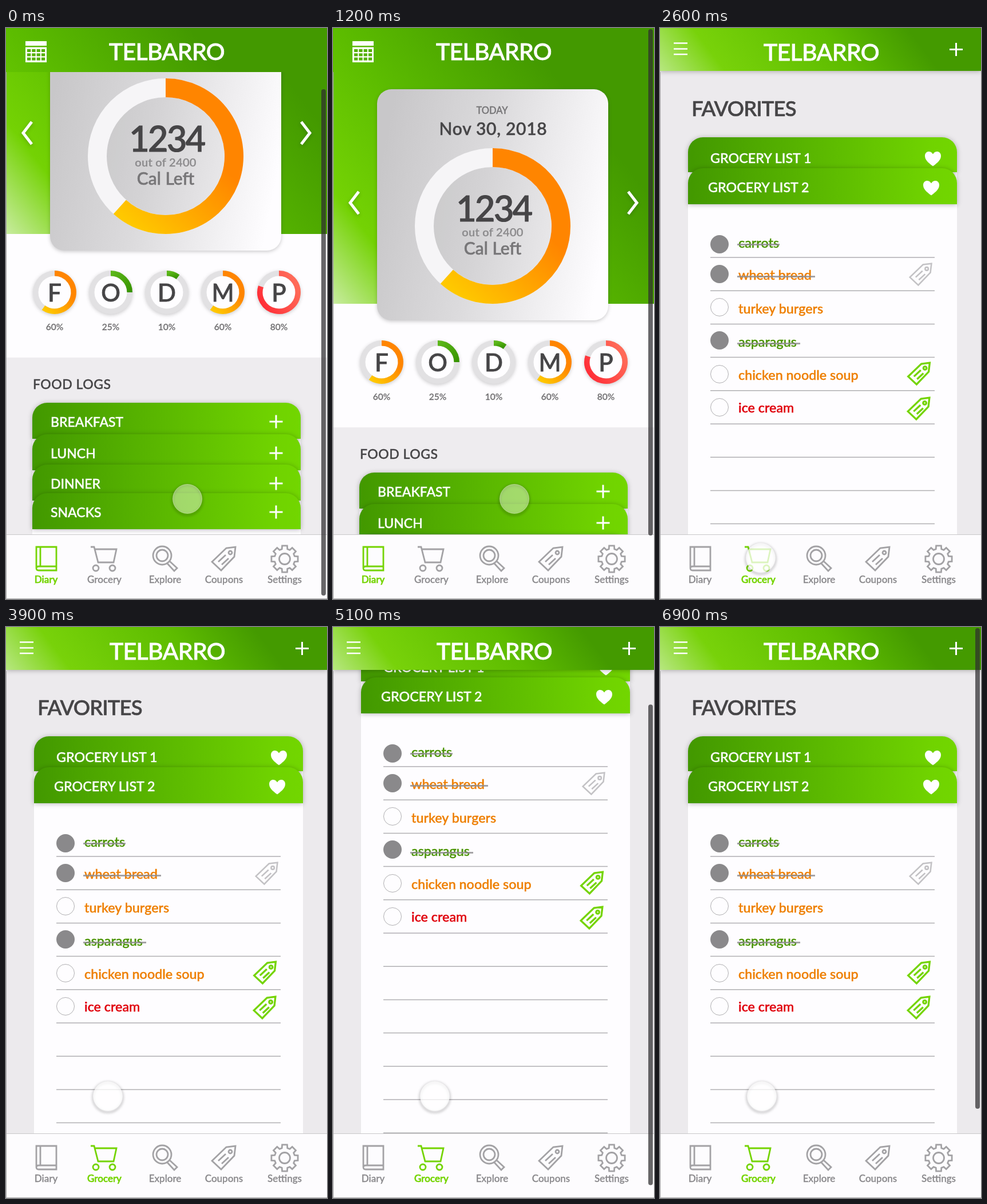
These frames come from a looping animation (561 px wide and 998 px high, 7000 ms). An HTML page:

```html
<!DOCTYPE html>
<html lang="en">
<head>
<meta charset="utf-8">
<title>Food diary app</title>
<style>
  html, body { margin: 0; width: 100%; height: 100%; overflow: hidden; background: #fefdff; }
  svg { display: block; width: 561px; height: 998px; }
  text { font-family: Lato, sans-serif; font-weight: 500; }
  .card { filter: drop-shadow(0 1px 4px rgba(0,0,0,.28)); }
  .soft { filter: drop-shadow(0 2px 3px rgba(0,0,0,.2)); }
  .tab { --ink: #a3a2a5; --label: #8a898c; }
  .tab.on { --ink: #74d400; --label: #74d400; }
  .tab path { fill: none; stroke: var(--ink); stroke-width: 2.8; }
  .tab text { fill: var(--label); stroke: var(--label); stroke-width: .35px; }
  .tab.on text { stroke-width: .7px; }
</style>
</head>
<body>
<svg id="stage" viewBox="0 0 561 998"></svg>
<script>
const LOOP = 7000, STEP = 100, SWITCH = 2500;
const INK = '#464547', WHITE = '#fefdff', GREY = '#eeecef', LIME = '#74d400';

// Drawing helpers, each returning SVG markup; the thin stroke gives text a medium weight
const text = (x, y, size, fill, str, extra = '') =>
  `<text x="${x}" y="${y}" font-size="${size}" fill="${fill}" stroke="${fill}" stroke-width="${size * .02}" ${extra}>${str}</text>`;
const mid = (x, y, size, fill, str, extra = '') =>
  text(x, y, size, fill, str, `text-anchor="middle" ${extra}`);
const rect = (x, y, w, h, fill, extra = '') =>
  `<rect x="${x}" y="${y}" width="${w}" height="${h}" fill="${fill}" ${extra}/>`;
const line = (d, color, width) =>
  `<path d="${d}" fill="none" stroke="${color}" stroke-width="${width}"/>`;
const circle = (x, y, r, fill, extra = '') =>
  `<circle cx="${x}" cy="${y}" r="${r}" fill="${fill}" ${extra}/>`;
const plus = (x, y) => line(`M${x - 11.5} ${y}h23M${x} ${y - 11.5}v23`, '#fff', 3);
const gradient = (id, coords, stops, units = 'objectBoundingBox') => {
  const [x1, y1, x2, y2] = coords;
  return `<linearGradient id="${id}" gradientUnits="${units}" x1="${x1}" y1="${y1}" x2="${x2}" y2="${y2}">` +
    stops.map(([o, c]) => `<stop offset="${o}" stop-color="${c}"/>`).join('') + '</linearGradient>';
};

function arc(x, y, r, part, paint, width) {
  const a = part * 2 * Math.PI;
  return line(`M${x} ${y - r}A${r} ${r} 0 ${part > .5 ? 1 : 0} 1 ${x + r * Math.sin(a)} ${y - r * Math.cos(a)}`,
    `url(#${paint})`, width);
}

// Panel with a green rounded head and a white body
const panel = (x, y, w, head, body) => rect(x, y + head, w, body, WHITE) +
  `<path class="card" d="M${x} ${y + head}V${y + 26}a26 26 0 0 1 26 -26h${w - 52}a26 26 0 0 1 26 26V${y + head}z" fill="url(#head)"/>`;

const heart = (x, y) => `<path transform="translate(${x} ${y})" fill="#fff"
  d="M0 12.500C-9 6 -14 1 -14 -5.500C-14 -14 -4 -15.500 0 -8.500C4 -15.500 14 -14 14 -5.500C14 1 9 6 0 12.500z"/>`;

const tag = 'M-21 5L4 -19L20 -21L18 -4L-5 20ZM-10 5L3 -7M-4 10L8 -1M8 -11a3 3 0 1 0 6 0a3 3 0 1 0 -6 0';
const placedTag = (x, y, color, width) =>
  `<g transform="translate(${x} ${y}) scale(.92)">${line(tag, color, width)}</g>`;

function gear() {
  const points = [];
  for (let i = 0; i < 8; i++)
    for (const [turn, r] of [[-.27, 18], [-.19, 23.5], [.19, 23.5], [.27, 18]]) {
      const a = i * Math.PI / 4 + turn;
      points.push(`${(r * Math.sin(a)).toFixed(1)} ${(-r * Math.cos(a)).toFixed(1)}`);
    }
  return `M${points.join('L')}ZM-9.500 0a9.500 9.500 0 1 0 19 0a9.500 9.500 0 1 0 -19 0`;
}

const defs = '<defs>' +
  gradient('sky', [0, 482, 480, 100], [[0, '#c8ec9f'], [.2, '#74d204'], [.5, '#5cbc00'], [.9, '#439900']], 'userSpaceOnUse') +
  gradient('bar', [0, 90, 320, -150], [[0, '#bde98b'], [.25, '#78d20a'], [.7, '#5ebc00'], [1, '#449a00']], 'userSpaceOnUse') +
  gradient('head', [0, 0, 1, 0], [[0, '#429800'], [.9, '#70d300'], [1, '#72d600']]) +
  gradient('silver', [0, .4, 1, .6], [[0, '#c8c7c9'], [.45, '#dcdbdd'], [1, '#fefdff']]) +
  gradient('orange', [.1, 1, .6, .35], [[0, '#ffc800'], [1, '#ff8500']]) +
  gradient('green', [0, 0, 1, 1], [[0, '#5cb81a'], [1, '#389400']]) +
  gradient('red', [0, .7, .9, .2], [[0, '#ff2f38'], [1, '#ff6a58']]) +
  '</defs>';

const title = (x, y) => text(x, y, 41, '#fff', 'TELBARRO', 'letter-spacing="-.7"');

function diary() {
  const rings = [['F', 60, 'orange'], ['O', 25, 'green'], ['D', 10, 'green'], ['M', 60, 'orange'], ['P', 80, 'red']];
  const logs = [['BREAKFAST', 777], ['LUNCH', 832], ['DINNER', 885], ['SNACKS', 935]];
  let cells = '';
  for (let i = 0; i < 12; i++)
    cells += rect(37 + i % 4 * 8.3, 37 + Math.floor(i / 4) * 7.3, 6.3, 5, '#55b000');
  return `<g id="diary"><g id="diaryBody">
    ${rect(0, 0, 561, 482, 'url(#sky)')}${rect(0, 482, 561, 216, WHITE)}${rect(0, 698, 561, 480, GREY)}
    ${rect(77, 107, 404, 404, 'url(#silver)', 'rx="25" class="soft"')}
    ${mid(278, 150, 16.5, '#757476', 'TODAY')}
    ${mid(280, 187, 30, INK, 'Nov 30, 2018', 'letter-spacing=".7"')}
    ${circle(279, 346, 103, '#000', 'opacity=".035"')}
    ${circle(279, 346, 119.5, 'none', 'stroke="#f6f5f7" stroke-width="33"')}
    ${arc(279, 346, 119.5, .617, 'orange', 33)}
    ${mid(281, 338, 61, INK, '1234', 'letter-spacing="-2.500"')}
    ${mid(279, 364, 20, '#8b8a8c', 'out of 2400', 'letter-spacing=".3"')}
    ${mid(279, 396, 30, '#777678', 'Cal Left')}
    <g class="soft">${line('M45 286L30 305.500L45 325M516 286L531 305.500L516 325', '#fff', 5)}</g>
    ${rings.map(([name, pct, paint], i) => {
      const x = 85 + 98 * i;
      return `<g class="soft">${circle(x, 584, 38, '#e2e1e3')}</g>${circle(x, 584, 28.5, WHITE)}` +
        arc(x, 584, 33.2, pct / 100, paint, 9.5) +
        mid(x, 600, 42, INK, name) + mid(x, 650, 15.5, '#6f6e70', pct + '%');
    }).join('')}
    ${text(47, 753, 23, INK, 'FOOD LOGS', 'letter-spacing=".5"')}
    ${logs.map(([name, y]) => panel(46, y, 469, 63, 60) +
      text(78, y + 42, 23, '#fff', name) + plus(472, y + 33)).join('')}
    </g>
    ${rect(0, 0, 561, 77, 'url(#sky)')}
    ${rect(34, 23, 37, 8, '#fff')}${rect(34, 33.5, 37, 26.5, '#fff')}${cells}
    ${title(180, 56)}</g>`;
}

function grocery() {
  const green = '#4a9400', orange = '#ee7f00';
  // label, colour, circle y, baseline, strike length
  const items = [
    ['carrots', green, 378, 384, 74], ['wheat bread', orange, 430, 440, 136],
    ['turkey burgers', orange, 488, 499, 0], ['asparagus', green, 546, 557, 110],
    ['chicken noodle soup', orange, 605, 615, 0], ['ice cream', '#e0000c', 663, 672, 0]];
  let rules = '';
  for (let i = 0; i < 12; i++) rules += `M88 ${401 + 58.2 * i}H480`;
  return `<g id="grocery">${rect(0, 0, 561, 998, '#eceaed')}<g id="groceryBody">
    ${text(55, 154, 36.5, INK, 'FAVORITES', 'letter-spacing="-.9"')}
    ${panel(49, 191, 470, 61, 118)}${text(88, 236, 23.3, '#fff', 'GROCERY LIST 1')}${heart(477, 229)}
    ${panel(49, 245, 470, 63, 900)}${text(84, 287, 23.3, '#fff', 'GROCERY LIST 2')}${heart(474, 280)}
    ${line(rules, '#b0afb2', 1.5)}
    ${items.map(([name, color, y, base, strike]) =>
      (strike ? circle(104, y, 16, '#8a898b') : circle(104, y, 15.5, WHITE, 'stroke="#b0afb2"')) +
      text(137, base, 23.3, color, name) +
      (strike ? line(`M135 ${base - 5.5}h${strike}`, '#8f8e90cc', 3) : '')).join('')}
    ${placedTag(456, 431, '#c3c2c5', 2.8)}${placedTag(453, 604.5, LIME, 3.6)}${placedTag(452.5, 665.5, LIME, 3.6)}
    </g>
    ${rect(0, 0, 561, 75, 'url(#bar)', 'class="card"')}
    ${line('M24 26.500h24M24 36.500h24M24 46h24', '#fff', 2.6)}${plus(517.5, 37.5)}${title(181, 57)}</g>`;
}

function tabs() {
  const icons = [
    ['Diary', 70, 'M-17 -21H18V20H-13q-4 0 -4 -4ZM-10 -21V13M-17 16q0 -3 4 -3H18'],
    ['Grocery', 172, 'M-24 -21h6L-11 6H16L21 -17H-17M-20 16a5 5 0 1 0 10 0a5 5 0 1 0 -10 0M9 16a5 5 0 1 0 10 0a5 5 0 1 0 -10 0'],
    ['Explore', 278, 'M-21 -6a16 16 0 1 0 32 0a16 16 0 1 0 -32 0M-15 -6a10 10 0 1 0 20 0a10 10 0 1 0 -20 0M8 4L21 16L16 21L4 8'],
    ['Coupons', 381, tag],
    ['Settings', 487, gear()]];
  return rect(0, 885, 561, 113, '#fdfcfe') + line('M0 885.500H561', '#c9c8ca', 1) +
    icons.map(([name, x, d]) => `<g class="tab" id="tab${name}">
      <path transform="translate(${x} 928)" d="${d}"/>${mid(x, 970, 17, '', name)}</g>`).join('') +
    line('M.5 77V997.500H561', '#a9a8aa', 1);
}

document.getElementById('stage').innerHTML = defs + diary() + grocery() + tabs() + `
  <g id="touch">${circle(0, 2, 26, 'none', 'stroke="#000" stroke-opacity=".25" stroke-width="3" style="filter:blur(2px)"')}
  ${circle(0, 0, 25.5, '#fff', 'id="touchFill" stroke="#fff" stroke-opacity=".4"')}</g>
  ${rect(551, 2, 8, 885, '#2e2d30', 'id="thumb" rx="4"')}`;

// Smooth interpolation through [time, value] keys
function track(t, keys) {
  if (t <= keys[0][0]) return keys[0][1];
  for (let i = 1; i < keys.length; i++) {
    const [t0, v0] = keys[i - 1], [t1, v1] = keys[i];
    if (t < t1) {
      const u = (t - t0) / (t1 - t0);
      return v0 + (v1 - v0) * u * u * (3 - 2 * u);
    }
  }
  return keys[keys.length - 1][1];
}

// lead: how far the scroll bar runs ahead of the page, in ms
const pages = {
  diary: { scroll: [[0, 122], [662, 0], [1250, 0], [1750, 72]], lead: 5, ratio: .86, thumb: 885, touch: .42 },
  grocery: { scroll: [[4000, 0], [5400, 178], [5570, 178], [6250, 0]], lead: 15, ratio: .84, thumb: 840, touch: .75 }
};
const touchX = [[1850, 317], [2350, 176], [3350, 176], [3900, 178]];
const touchY = [[1850, 823], [2350, 926], [3350, 926], [3900, 820]];
const thumbAlpha = [[1850, .72], [2150, 0], [3950, 0], [4150, .72]];

const el = id => document.getElementById(id);
const move = (id, x, y) => el(id).setAttribute('transform', `translate(${x} ${y})`);

function draw() {
  const t = Math.floor(performance.now() % LOOP / STEP) * STEP;
  const onDiary = t < SWITCH;
  const name = onDiary ? 'diary' : 'grocery', page = pages[name];
  el('diary').style.display = onDiary ? '' : 'none';
  el('grocery').style.display = onDiary ? 'none' : '';
  el('tabDiary').classList.toggle('on', onDiary);
  el('tabGrocery').classList.toggle('on', !onDiary);
  move(name + 'Body', 0, -track(t, page.scroll));
  move('touch', track(t, touchX), track(t, touchY));
  el('touchFill').setAttribute('fill-opacity', page.touch);
  move('thumb', 0, track(t + page.lead, page.scroll) * page.ratio);
  el('thumb').setAttribute('height', page.thumb);
  el('thumb').setAttribute('opacity', track(t, thumbAlpha));
  requestAnimationFrame(draw);
}
draw();
</script>
</body>
</html>
```
